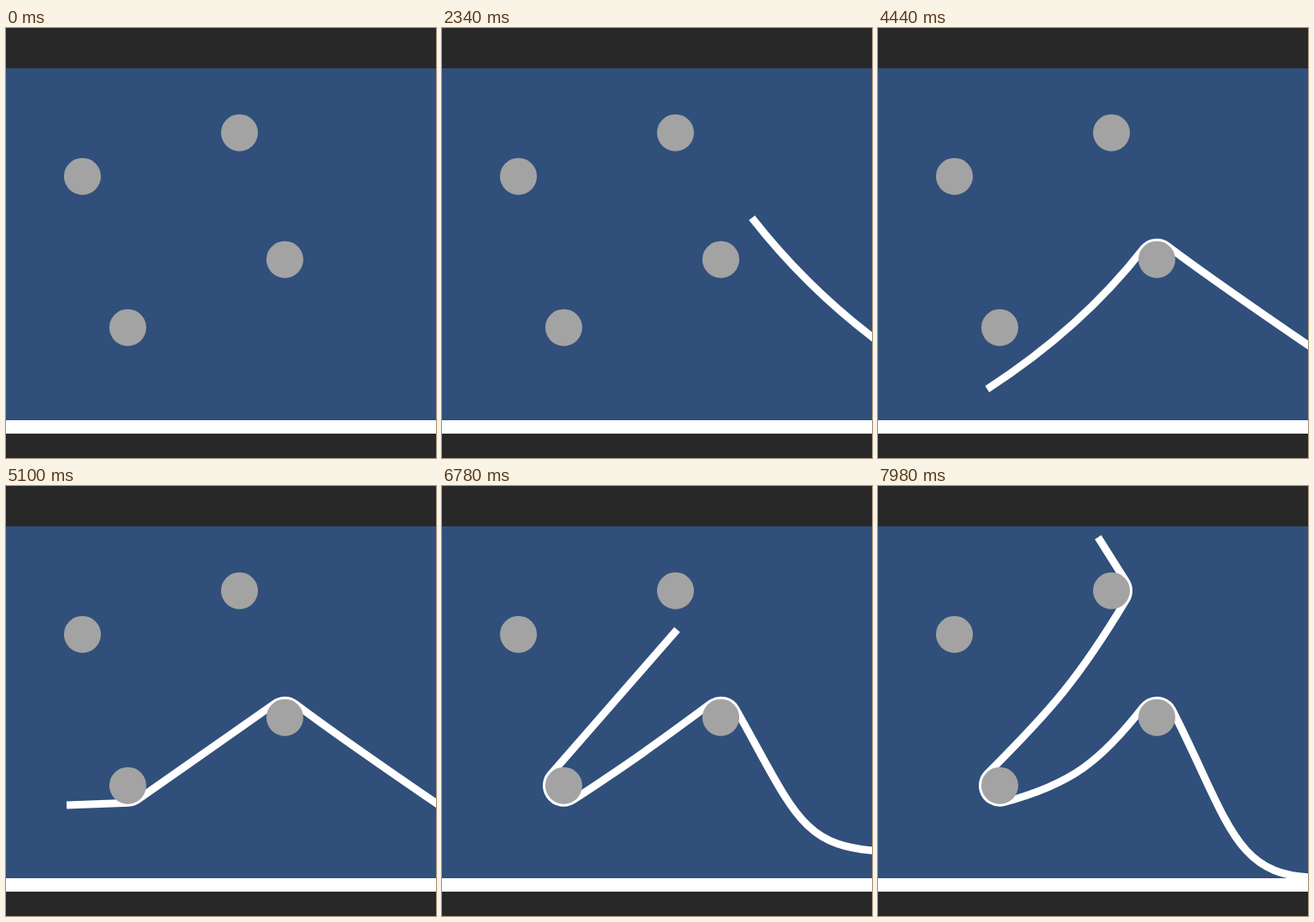
Animation of 512 by 512 pixels, one loop 8000 ms. Source, as an HTML page with a canvas:

```html
<!DOCTYPE html>
<html lang="en">
<head>
<meta charset="utf-8">
<title>Rope and pins</title>
<style>
  html, body { margin: 0; height: 100%; overflow: hidden; background: #282828; }
  canvas { display: block; width: 100vw; height: 100vh; }
</style>
</head>
<body>
<canvas id="stage" width="512" height="512"></canvas>
<script>
const ctx = document.getElementById('stage').getContext('2d');
const LOOP = 8000, STEP = 60, ENTER = 780, LIFT = 1620, SLACKEN = 5820, END = 7980;
const PIN_RADIUS = 22, WRAP_RADIUS = 20.5, ROPE_WIDTH = 9, EDGE_X = 520;
const RAD = Math.PI / 180, TURN = 2 * Math.PI;

// side: -1 wraps counter-clockwise, 1 clockwise; contact: time the rope touches it
const right = { x: 332, y: 275.7, side: -1, contact: 2640 };
const low = { x: 145, y: 356.7, side: 1, contact: 4800 };
const high = { x: 278, y: 124.7, side: -1, contact: 7150 };
const idle = { x: 91, y: 176.7 };
const pins = [right, low, high, idle];

// Waypoints of the rope's free end: time, x, y
const tipPath = [
  [ENTER, 512, 354], [1200, 470, 305], [LIFT, 454, 247], [2340, 369, 226],
  [3240, 233, 277], [4080, 188, 408], [4440, 130, 430], [4980, 70, 398],
  [SLACKEN, 135, 249], [6780, 280, 171], [7140, 312, 124], [7440, 300, 77],
  [END, 262, 61]
];

const ramp = (t, from, to) => Math.min(1, Math.max(0, (t - from) / (to - from)));
const easeOut = (t, from, to, power = 2) => 1 - (1 - ramp(t, from, to)) ** power;

// Smooth curve through the waypoints
function tipAt(t) {
  const last = tipPath.length - 1;
  const slope = (i, c) => {
    const a = tipPath[Math.max(0, i - 1)], b = tipPath[Math.min(last, i + 1)];
    return (b[c] - a[c]) / (b[0] - a[0]);
  };
  let i = 0;
  while (i < last - 1 && t >= tipPath[i + 1][0]) i++;
  const a = tipPath[i], b = tipPath[i + 1], length = b[0] - a[0];
  const u = (t - a[0]) / length, v = 1 - u;
  const at = c => v * v * (1 + 2 * u) * a[c] + u * u * (3 - 2 * u) * b[c]
    + length * u * v * (v * slope(i, c) - u * slope(i + 1, c));
  return { x: at(1), y: at(2) };
}

// Height at which the rope enters: dips, rises, settles, then falls to the floor
const edgeHeight = t => 358
  - 34 * ramp(t, ENTER, LIFT)
  + 72 * easeOut(t, LIFT, 3240)
  - 13 * easeOut(t, 3240, 4440)
  + 83 * easeOut(t, SLACKEN, END, 1.65);

// Point on the wrapped rope and its direction of travel
function wrapPoint(pin, angle) {
  const c = Math.cos(angle), s = Math.sin(angle);
  return {
    x: pin.x + WRAP_RADIUS * c, y: pin.y + WRAP_RADIUS * s,
    dx: -pin.side * s, dy: pin.side * c
  };
}

function wrap(pin, from, to) {
  let sweep = (((to - from) * pin.side) % TURN + TURN) % TURN;
  if (sweep > 0.75 * TURN) sweep = 0;
  const end = from + pin.side * sweep;
  ctx.arc(pin.x, pin.y, WRAP_RADIUS, from, end, pin.side < 0);
  return wrapPoint(pin, end);
}

function span(a, b) {
  const h = 0.41 * Math.hypot(b.x - a.x, b.y - a.y);
  ctx.bezierCurveTo(a.x + a.dx * h, a.y + a.dy * h, b.x - b.dx * h, b.y - b.dy * h, b.x, b.y);
}

function tail(pin, from, tip, bend) {
  const dx = tip.x - pin.x, dy = tip.y - pin.y;
  const reach = Math.acos(Math.min(1, WRAP_RADIUS / Math.hypot(dx, dy)));
  const p = wrap(pin, from, Math.atan2(dy, dx) - pin.side * (reach - bend));
  const h = 0.48 * Math.hypot(tip.x - p.x, tip.y - p.y);
  ctx.quadraticCurveTo(p.x + p.dx * h, p.y + p.dy * h, tip.x, tip.y);
}

function freeRope(t, tip, edgeY) {
  const dx = tip.x - EDGE_X, dy = tip.y - edgeY;
  const sag = 20 * ramp(t, LIFT, right.contact) / Math.hypot(dx, dy);
  ctx.quadraticCurveTo(EDGE_X + dx / 2 + dy * sag, edgeY + dy / 2 - dx * sag, tip.x, tip.y);
}

function wrappedRope(t, tip, edgeY) {
  const sag = easeOut(t, SLACKEN, END, 4);
  const swing = easeOut(t, 3240, 4440);
  const rightIn = (-45 - 8 * swing + 26 * sag) * RAD;
  const p = wrapPoint(right, rightIn), h = 50 + 100 * sag;
  ctx.bezierCurveTo(EDGE_X - 60 - 36 * sag, edgeY - 41 + 40 * sag,
    p.x - p.dx * h, p.y - p.dy * h, p.x, p.y);
  if (t < low.contact) {
    return tail(right, rightIn, tip, 10 * RAD * swing * (1 - ramp(t, 4440, low.contact)));
  }

  const lowSlack = ramp(t, SLACKEN, END) ** 3;
  const lowIn = (55 + 20 * lowSlack) * RAD;
  span(wrap(right, rightIn, (-125 - 17 * lowSlack) * RAD), wrapPoint(low, lowIn));
  if (t < high.contact) return tail(low, lowIn, tip, 0);

  const highSlack = ramp(t, high.contact, END);
  const highIn = (38.5 - 7.5 * highSlack) * RAD;
  span(wrap(low, lowIn, (218.5 + 6.5 * highSlack) * RAD), wrapPoint(high, highIn));
  tail(high, highIn, tip, 0);
}

function drawRope(t) {
  const edgeY = edgeHeight(t), shape = t < right.contact ? freeRope : wrappedRope;
  ctx.beginPath();
  ctx.moveTo(EDGE_X, edgeY);
  shape(t, tipAt(t), edgeY);
  ctx.strokeStyle = '#fff';
  ctx.lineWidth = ROPE_WIDTH;
  ctx.lineJoin = 'round';
  ctx.stroke();
}

function fillBand(color, top, bottom) {
  ctx.fillStyle = color;
  ctx.fillRect(0, top, 512, bottom - top);
}

function draw(now) {
  const t = Math.floor((now % LOOP) / STEP) * STEP;
  fillBand('#282828', 0, 512);
  fillBand('#304f7a', 48, 467);
  if (t >= ENTER) drawRope(t);
  fillBand('#fff', 467, 483);
  ctx.fillStyle = '#a3a3a3';
  for (const { x, y } of pins) {
    ctx.beginPath();
    ctx.arc(x, y, PIN_RADIUS, 0, TURN);
    ctx.fill();
  }
}

const start = performance.now();
function frame() {
  draw(performance.now() - start);
  requestAnimationFrame(frame);
}
frame();
</script>
</body>
</html>
```
